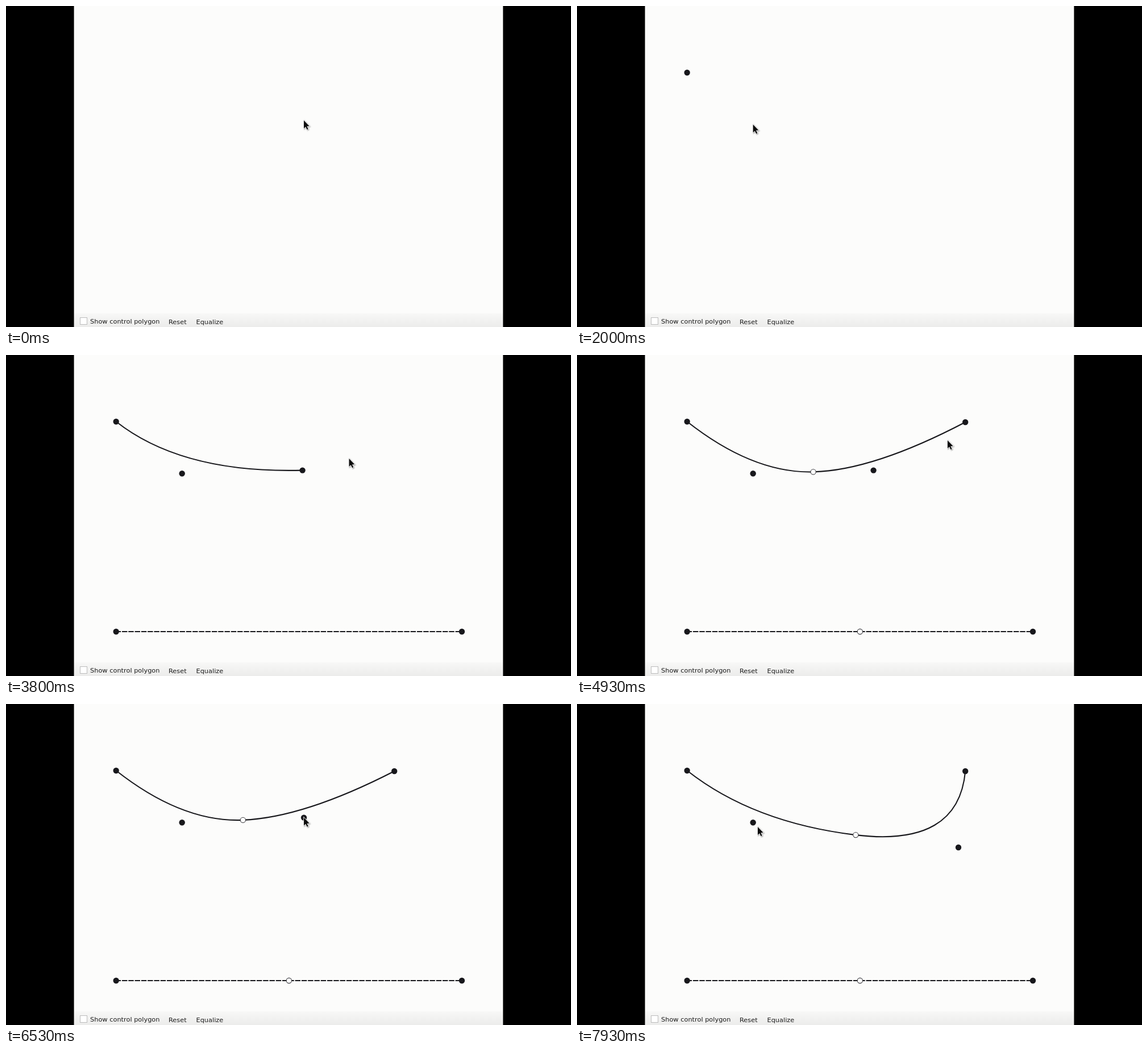
An HTML page with a canvas for the animation above (8 s loop, 994x564 px).

```html
<!DOCTYPE html>
<html lang="en">
<head>
<meta charset="utf-8">
<title>Quadratic spline editor</title>
<style>
  html, body { margin: 0; width: 100%; height: 100%; overflow: hidden; background: #000; }
  canvas { display: block; }
</style>
</head>
<body>
<canvas id="stage" width="994" height="564"></canvas>
<script>
const ctx = document.getElementById('stage').getContext('2d');
const LOOP = 8000, STEP = 1000 / 15;
const INK = '#18181c';
const PEN = 1.88;

const points = [[193.7, 117], [309.7, 208.2], [521.6, 202.6], [683.2, 118]];
const clicks = [19, 33, 48, 70];
const drag = { start: 95, end: 107.9 };

// Pointer moves, timed in steps; bend bows the path sideways
const home = [524, 201];
const moves = [
  { start: 1, end: 17, to: points[0] },
  { start: 24, end: 30, to: points[1] },
  { start: 36, end: 46, to: points[2] },
  { start: 50, end: 65, to: points[3], bend: 0.11 },
  { start: 71.5, end: 79, to: [540, 203], bend: -0.09 },
  { start: 86, end: drag.start, to: points[2] },
  { start: drag.start, end: 97.4, to: [522.5, 199.5] },
  { start: 97.4, end: drag.end, to: [671, 252], bend: -0.075 },
  { start: drag.end, end: 118, to: [318, 216], bend: -0.08 }
];

const smooth = u => u * u * (3 - 2 * u);
const middle = (a, b) => [(a[0] + b[0]) / 2, (a[1] + b[1]) / 2];

function pointerAt(k) {
  let pos = home;
  for (const { start, end, to, bend = 0 } of moves) {
    if (k <= start) break;
    const s = smooth(Math.min(1, (k - start) / (end - start)));
    const bow = 4 * s * (1 - s) * bend;
    const dx = to[0] - pos[0], dy = to[1] - pos[1];
    pos = [pos[0] + dx * s - dy * bow, pos[1] + dy * s + dx * bow];
  }
  return pos;
}

function dot([x, y], hollow) {
  ctx.beginPath();
  ctx.arc(x, y, hollow ? 4.6 : 5.2, 0, 7);
  ctx.fillStyle = hollow ? '#fff' : INK;
  ctx.fill();
  if (hollow) {
    ctx.strokeStyle = '#3c3c40';
    ctx.lineWidth = 1.1;
    ctx.stroke();
  }
}

function drawWindow() {
  ctx.fillStyle = '#000';
  ctx.fillRect(0, 0, 994, 564);
  ctx.fillStyle = '#fcfcfb';
  ctx.fillRect(119.6, 0, 754.8, 564);
  const bar = ctx.createLinearGradient(0, 539, 0, 564);
  bar.addColorStop(0, '#f8f8f7');
  bar.addColorStop(1, '#ececeb');
  ctx.fillStyle = bar;
  ctx.fillRect(120, 540, 754, 24);

  ctx.fillStyle = '#fff';
  ctx.fillRect(130, 547, 13, 13);
  ctx.strokeStyle = '#bcbcbc';
  ctx.lineWidth = 1;
  ctx.strokeRect(130.5, 547.5, 12, 12);
  ctx.font = '11.35px "DejaVu Sans", sans-serif';
  ctx.fillStyle = '#1c1c1c';
  ctx.fillText('Show control polygon', 148, 558);
  ctx.fillText('Reset', 286, 559);
  ctx.fillText('Equalize', 334.5, 559);
}

function drawCurve(p, knot) {
  ctx.strokeStyle = INK;
  ctx.lineWidth = 2.1;
  ctx.beginPath();
  ctx.moveTo(...p[0]);
  if (knot) {
    ctx.quadraticCurveTo(...p[1], ...knot);
    ctx.quadraticCurveTo(...p[2], ...p[3]);
  } else {
    ctx.quadraticCurveTo(...p[1], ...p[2]);
  }
  ctx.stroke();
}

function drawKnotLine(split) {
  const left = [193.7, 486], right = [802, 486];
  ctx.strokeStyle = INK;
  ctx.lineWidth = PEN;
  ctx.lineCap = 'square';
  ctx.setLineDash([4 * PEN, 2 * PEN]);
  ctx.beginPath();
  ctx.moveTo(...left);
  ctx.lineTo(...right);
  ctx.stroke();
  ctx.setLineDash([]);
  ctx.lineCap = 'butt';
  dot(left);
  dot(right);
  if (split) dot(middle(left, right), true);
}

function drawPointer([x, y]) {
  ctx.save();
  ctx.translate(x, y);
  ctx.beginPath();
  [[0, 0], [0, 14], [3.2, 11.2], [5.6, 16.2], [7.6, 15.2], [5.4, 10.3], [9.6, 10]]
    .forEach(q => ctx.lineTo(...q));
  ctx.closePath();
  ctx.shadowColor = 'rgba(0,0,0,.4)';
  ctx.shadowBlur = 2;
  ctx.shadowOffsetX = ctx.shadowOffsetY = 1;
  ctx.strokeStyle = '#f4f4f4';
  ctx.lineWidth = 1.6;
  ctx.stroke();
  ctx.shadowColor = 'transparent';
  ctx.fillStyle = '#0c0c0c';
  ctx.fill();
  ctx.restore();
}

function draw(k) {
  drawWindow();
  const p = points.filter((_, i) => k >= clicks[i]);
  if (k >= drag.start) p[2] = pointerAt(Math.min(k, drag.end));
  const knot = p.length > 3 && middle(p[1], p[2]);
  if (p.length > 2) {
    drawCurve(p, knot);
    drawKnotLine(knot);
  }
  p.forEach(q => dot(q));
  if (knot) dot(knot, true);
  drawPointer(pointerAt(k));
}

const start = performance.now();
function tick() {
  const t = (performance.now() - start) % LOOP;
  // Step times are rounded to 10 ms, hence the small lead
  draw(Math.floor((t + 4) / STEP) % 120);
  requestAnimationFrame(tick);
}
tick();
</script>
</body>
</html>
```
